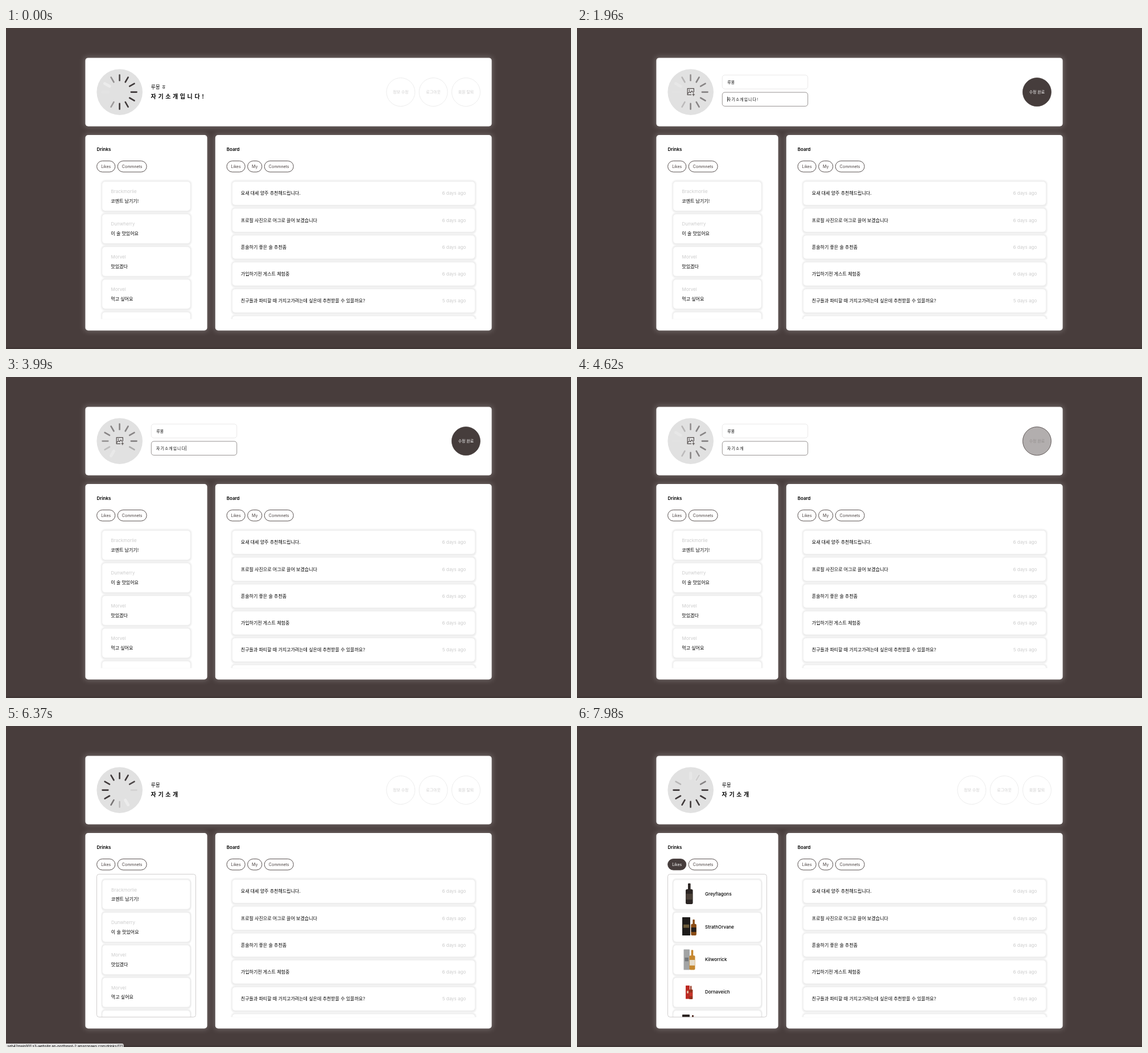
These frames come from a looping animation (993x564 px, 8000 ms). An HTML page:

```html
<!DOCTYPE html>
<html lang="ko">
<head>
<meta charset="utf-8">
<title>Profile page</title>
<style>
  html, body { margin: 0; width: 100%; height: 100%; overflow: hidden; background: #483d3c; }
  svg { display: block; width: 100vw; height: 100vh; }
  text { font-family: Inter, "Noto Sans CJK KR", "Noto Sans CJK", sans-serif; font-size: 8px; fill: #000; white-space: pre; }
  .ko { font-family: "Noto Sans CJK KR", "Noto Sans CJK", sans-serif; font-weight: 500; }
  .pale { fill: #ccc; }
  .mid { text-anchor: middle; }
  .end { text-anchor: end; }
</style>
</head>
<body>
<svg viewBox="0 0 993 564" preserveAspectRatio="none">
  <defs>
    <filter id="glow" x="-10%" y="-20%" width="120%" height="140%"><feGaussianBlur stdDeviation="5"/></filter>
    <filter id="soft" x="-5%" y="-15%" width="110%" height="130%"><feGaussianBlur stdDeviation="0.8"/></filter>
    <clipPath id="list"><rect x="150" y="255" width="690" height="256.5"/></clipPath>
  </defs>
  <rect width="993" height="564" fill="#483d3c"/>
  <rect y="561" width="993" height="3" fill="#413736"/>
  <g id="panels"></g>
  <g id="tabs"></g>
  <g id="board" clip-path="url(#list)"></g>
  <g id="drinks" clip-path="url(#list)"></g>
  <rect id="frame" x="159.5" y="260.4" width="174" height="251" rx="4" fill="none" stroke="#c4c2c2" stroke-width=".8"/>
  <circle cx="199.7" cy="112.6" r="40.3" fill="#e1e1e1"/>
  <g id="spinner" transform="translate(199.6 112.6)" stroke-linecap="round"></g>
  <g id="view"></g>
  <g id="edit"></g>
  <g id="status">
    <path d="M0 558H204.5Q206.7 558 206.7 560.5V564H0Z" fill="#e2e1e1"/>
    <text x="2.5" y="565" style="font-size:6.1px" fill="#333">seb42main001.s3-website.ap-northeast-2.amazonaws.com/drinks/121</text>
  </g>
  <path id="arrow" d="M0 0V22.5L5.1 17.8L8.6 26.2L12.4 24.6L8.9 16.4H15.6Z" fill="#000" stroke="#fff" stroke-width="1.2" stroke-linejoin="round"/>
</svg>
<script>
const LOOP = 8000, STEP = 70, DARK = [70, 61, 60];
const EDIT_ON = 420, EDIT_OFF = 5110;
const NICK = '루몽', BIO = '자기소개입니다!';

const $ = id => document.getElementById(id);
const clamp = v => Math.max(0, Math.min(1, v));
const ramp = (t, from, length) => clamp((t - from) / length);
const ease = p => p * p * (3 - 2 * p);
const within = (t, from, to) => t >= from && t < to;
const show = (node, on) => node.setAttribute('display', on ? 'inline' : 'none');
const mix = (a, b, p) => `rgb(${a.map((v, i) => Math.round(v + (b[i] - v) * p))})`;

function add(parent, tag, attrs, content) {
  const node = document.createElementNS('http://www.w3.org/2000/svg', tag);
  for (const key in attrs) node.setAttribute(key, attrs[key]);
  if (content !== undefined) node.textContent = content;
  parent.appendChild(node);
  return node;
}
const box = (parent, x, y, width, height, fill, extra) =>
  add(parent, 'rect', { x, y, width, height, fill, ...extra });
const label = (parent, x, y, content, cls = '', style = '') =>
  add(parent, 'text', { x, y, class: cls, style }, content);

// Panels
for (const [x, y, w, h] of [[139.4, 52.4, 714.2, 120.4], [139.4, 188, 214.2, 343.4], [367.8, 188, 485.8, 343.4]]) {
  box($('panels'), x - 2, y - 2, w + 4, h + 4, '#fff', { rx: 6, opacity: .2, filter: 'url(#glow)' });
  box($('panels'), x, y, w, h, '#fff', { rx: 5 });
}
label($('panels'), 159.4, 216, 'Drinks', '', 'font-weight:600');
label($('panels'), 387.8, 216, 'Board', '', 'font-weight:600');

function tab(x, width, name) {
  const pill = box($('tabs'), x, 233.6, width, 19.4, '#fff', { rx: 9.7, stroke: '#463d3c', 'stroke-width': .9 });
  const text = label($('tabs'), x + width / 2, 245.9, name, 'mid', 'font-size:7px');
  text.style.fill = '#463d3c';
  return { pill, text };
}
const likes = tab(159.6, 32.2, 'Likes');
tab(196.2, 51, 'Commnets');
tab(388, 32.2, 'Likes');
tab(424.6, 25.2, 'My');
tab(454.2, 51, 'Commnets');

function card(parent, x, y, width, height) {
  box(parent, x - 2, y - 2.6, width + 4.4, height + 6, '#ededed', { rx: 7, filter: 'url(#soft)' });
  return box(parent, x, y, width, height, '#fff', { rx: 5 });
}

// Board posts
[['요새 대세 양주 추천해드립니다.', 6], ['프로필 사진으로 어그로 끌어 보겠습니다', 6],
 ['혼술하기 좋은 술 추천좀', 6], ['가입하기전 게스트 체험중', 6],
 ['친구들과 파티할 때 가지고가려는데 싶은데 추천받을 수 있을까요?', 5], ['', 0]
].forEach(([title, days], i) => {
  const y = 270 + i * 47.25;
  card($('board'), 397.8, y, 426.2, 40.8);
  if (!title) return;
  label($('board'), 412.8, y + 23.4, title, 'ko');
  label($('board'), 808.2, y + 23.3, days + ' days ago', 'pale end');
});

// Drink lists
const cards = add($('drinks'), 'g', {});
for (let i = 0; i < 5; i++) card(cards, 169.2, 270 + i * 57.35, 154.6, 51);
const comments = add($('drinks'), 'g', {});
[['Brackmorlie', '코멘트 남기기!'], ['Dunwherry', '이 술 맛있어요'], ['Morvel', '맛있겠다'], ['Morvel', '먹고 싶어요']]
  .forEach(([drink, text], i) => {
    label(comments, 184.5, 290 + i * 57.35, drink, 'pale');
    label(comments, 184.3, 306.9 + i * 57.35, text, 'ko');
  });

const liked = add($('drinks'), 'g', {});
function bottle(x, y, w, h, glass, sticker) {
  box(liked, x + w * .32, y, w * .36, h * .4, glass, { rx: 1 });
  box(liked, x, y + h * .28, w, h * .72, glass, { rx: w * .2 });
  box(liked, x + .5, y + h * .5, w - 1, h * .28, sticker);
}
function carton(x, y, w, h, fill, trim) {
  box(liked, x, y, w, h, fill, { rx: .6 });
  box(liked, x + 2, y + h * .4, w - 4, h * .18, trim);
}
['Greyflagons', 'StrathOrvane', 'Kilworrick', 'Dornaveich'].forEach((name, i) =>
  label(liked, 225, 298.2 + i * 57.35, name, '', 'font-weight:500'));
bottle(191, 276.5, 12.6, 36.5, '#2b2523', '#4a4038');
carton(185, 336, 14, 32, '#1d1b1a', '#6b5a39');
bottle(200.3, 340, 9.6, 28, '#8a4c14', '#221d1b');
carton(187.5, 392.5, 10.5, 36, '#a2a4a5', '#74777a');
bottle(197.5, 393.5, 10, 35, '#c5872f', '#e5dccb');
carton(191, 456, 7, 23.5, '#bd2922', '#e2b9a0');
bottle(197, 456.5, 6.4, 23.5, '#96321d', '#c8352b');
carton(185, 507, 13, 20, '#2a211e', '#80633c');
bottle(199.5, 508, 8, 28, '#4a2219', '#8b6846');

// Profile: reading mode
const nick = label($('view'), 254.8, 107, '', 'ko', 'font-size:8.7px');
const bio = label($('view'), 254.6, 124, '', 'ko', 'font-size:10px;font-weight:700;letter-spacing:3.6px');
const buttons = ['정보 수정', '로그아웃', '회원 탈퇴'].map((name, i) => roundButton($('view'), 693.7 + i * 57.35, name));

function roundButton(parent, cx, name) {
  const disc = add(parent, 'circle', { cx, cy: 112.6, r: 25, fill: '#fff', 'stroke-width': .8 });
  const text = label(parent, cx, 115.2, name, 'ko mid', 'font-size:6.9px');
  return { disc, text };
}
function paint({ disc, text }, hover) {
  disc.setAttribute('stroke', mix([232, 231, 231], DARK, hover));
  text.style.fill = mix([205, 204, 204], DARK, hover);
}

// Profile: editing mode
const fields = [82.7, 113].map(y => box($('edit'), 255.3, y, 150.4, 24.4, '#fff', { rx: 4.5, 'stroke-width': .8 }));
const nickInput = label($('edit'), 264.3, 97.6, '', 'ko', 'font-size:6.9px');
const bioInput = label($('edit'), 264.1, 127.7, '', 'ko', 'font-size:6.8px;letter-spacing:1.15px');
const caret = box($('edit'), 0, 0, .7, 9, '#000');
const done = roundButton($('edit'), 808.4, '수정 완료');
done.disc.setAttribute('stroke', '#463d3c');
add($('edit'), 'path', {
  d: 'M201 117.3H194.2V106.4H205.4V112.8M194.6 115.2L197.6 111.8L199.4 113.6L201.8 110.6L204.6 113.6M204.7 114.6V119.4M202.3 117H207.1',
  fill: 'none', stroke: '#504a49', 'stroke-width': 1.2
});
add($('edit'), 'circle', { cx: 197.4, cy: 109.2, r: 1, fill: '#504a49' });

// Spinner: twelve spokes, a gap with a white head sweeping clockwise
const spokes = Array.from({ length: 12 }, (_, hour) => {
  const line = (stroke, width) => add($('spinner'), 'path', {
    d: 'M0 -20.3V-30', stroke, 'stroke-width': width, transform: `rotate(${hour * 30})`
  });
  return { white: line('#f4f4f4', 5), dark: line('#3f393a', 2.6) };
});
function drawSpinner(t, editing) {
  const head = t < EDIT_ON ? 10.2 + .4 * Math.floor(t / 90) : 10.2 + .4 * Math.floor((t - 1960) / 90 + .5);
  spokes.forEach(({ white, dark }, hour) => {
    const d = (((hour - head + 4) % 12) + 12) % 12 - 4;
    const ink = d >= 0 ? clamp(.14 + .42 * d) : clamp((-2.7 - d) / 1.2);
    dark.setAttribute('opacity', ink);
    white.setAttribute('opacity', .85 * Math.exp(-(((d + .5) / .5) ** 2)));
  });
  $('spinner').setAttribute('opacity', editing ? .55 : 1);
}

function drawProfile(t, editing) {
  show($('view'), !editing);
  show($('edit'), editing);
  const saved = t >= EDIT_OFF;
  nick.textContent = saved ? NICK : NICK + ' ㅎ';
  bio.textContent = saved ? BIO.slice(0, 4) : BIO;
  paint(buttons[0], saved ? 0 : ease(ramp(t, 0, 300)));
  paint(buttons[1], 0);
  paint(buttons[2], saved ? (1 - ramp(t, EDIT_OFF, 850)) ** 3.5 : 0);

  const focus = t < 770 ? -1 : t < 1680 ? 0 : 1;
  fields.forEach((field, i) => field.setAttribute('stroke', i === focus ? '#7d7877' : '#e4e3e3'));
  nickInput.textContent = t < 1120 ? NICK + ' ㅎ' : NICK;
  const erased = t < 3990 ? 0 : Math.min(4, 1 + Math.floor((t - 3990) / 140));
  bioInput.textContent = BIO.slice(0, 8 - erased);

  const bioEnd = erased ? 264 + 7.4 * (8 - erased) : 318.4;
  const atStart = within(t, 1750, 2590);
  const atEnd = within(t, 2660, 3150) || within(t, 3710, 4480);
  show(caret, within(t, 770, 1330) || atStart || atEnd);
  caret.setAttribute('x', focus === 0 ? (t < 1120 ? 284 : 278) : atStart ? 264.2 : bioEnd);
  caret.setAttribute('y', focus === 0 ? 90.6 : 120.6);

  const hover = ease(ramp(t, 4470, 270));
  done.disc.setAttribute('fill', mix(DARK, [255, 255, 255], hover));
  done.text.style.fill = mix([255, 255, 255], DARK, hover);
}

function drawDrinks(t) {
  const framed = within(t, 5600, 6720) || t >= 7770;
  const swapped = t >= 7210;
  show($('frame'), framed);
  show(comments, !swapped);
  show(liked, swapped);
  const inset = framed ? .55 : 0;
  cards.setAttribute('transform', framed ? `translate(${169.2 * .0065 + .1} ${inset}) scale(.9948 1)` : '');
  comments.setAttribute('transform', `translate(${inset} ${inset})`);
  const active = ease(ramp(t, 6930, 210));
  likes.pill.setAttribute('fill', mix([255, 255, 255], DARK, active));
  likes.text.style.fill = mix(DARK, [255, 255, 255], active);
}

function drawPointer(t) {
  show($('arrow'), within(t, 2870, 3640));
  const size = Math.min(ramp(t, 2800, 280), ramp(-t, -3640, 210));
  const x = 292.6 + 5 * Math.sin((t - 3220) / 110), y = 121.8 + 2 * Math.sin((t - 3220) / 150);
  $('arrow').setAttribute('transform', `translate(${x} ${y}) scale(${size})`);
}

function draw(now) {
  const t = Math.floor((now % LOOP) / STEP) * STEP;
  const editing = within(t, EDIT_ON, EDIT_OFF);
  drawSpinner(t, editing);
  drawProfile(t, editing);
  drawDrinks(t);
  drawPointer(t);
  $('status').setAttribute('opacity', Math.min(ramp(t, 5880, 140), 1 - ramp(t, 6860, 140)));
}

const start = performance.now();
(function tick() {
  draw(performance.now() - start);
  requestAnimationFrame(tick);
})();
</script>
</body>
</html>
```
